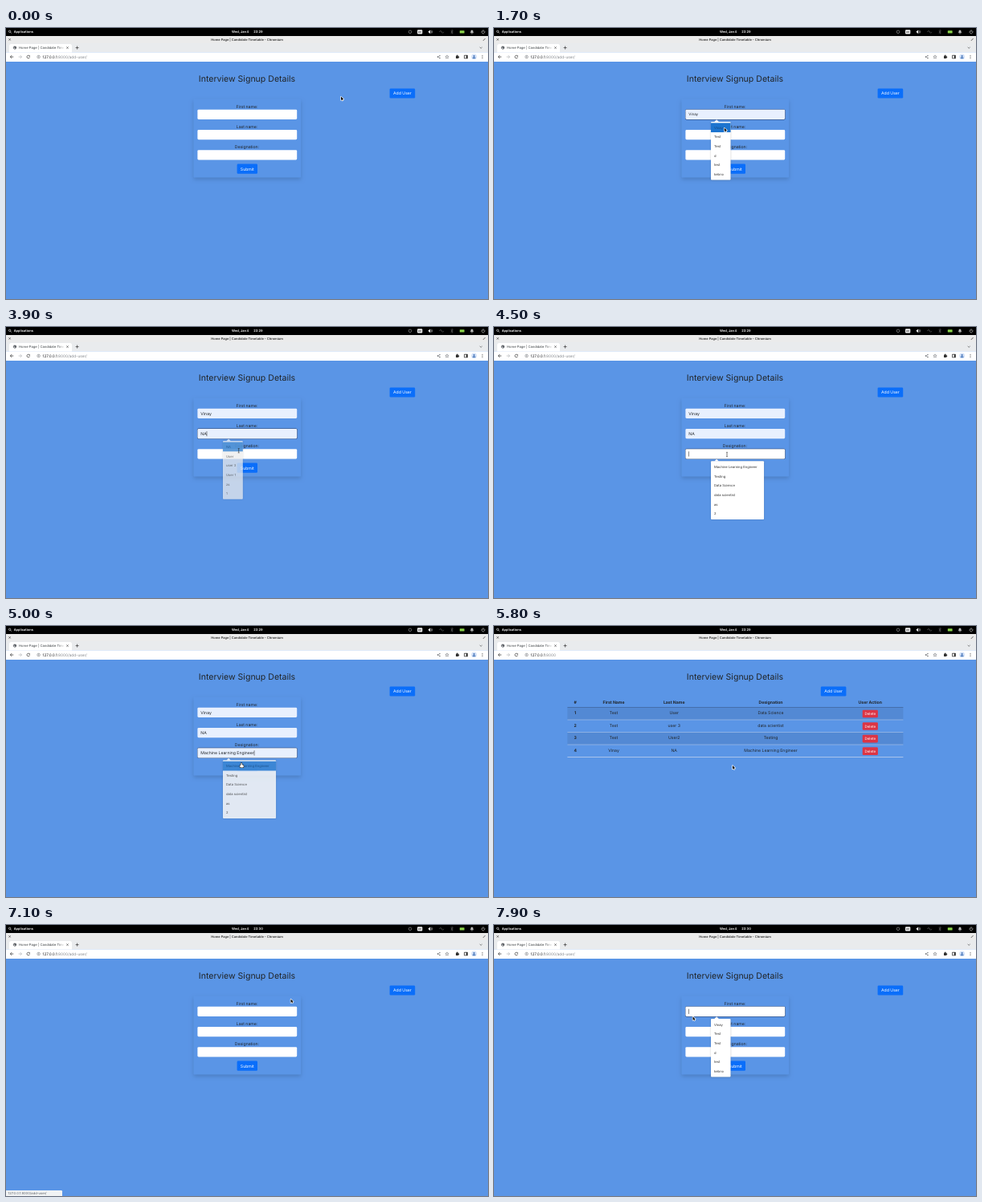
An HTML page with a canvas for the animation above (8000 ms loop, 600 by 338 pixels).

```html
<!DOCTYPE html>
<html lang="en">
<head>
<meta charset="utf-8">
<title>Interview Signup Details</title>
<style>
html, body { margin: 0; width: 100%; height: 100%; overflow: hidden; background: #5a95e6; }
canvas { display: block; width: 600px; height: 338px; }
</style>
</head>
<body>
<canvas id="stage" width="600" height="338"></canvas>
<script>
const ctx = document.getElementById('stage').getContext('2d');
const LOOP = 8000, LIST_AT = 5550, FORM_AT = 6920, CLOCK_AT = 6850;
const BLUE = '#5a95e6', PRIMARY = '#0a6efa', INK = '#212529', FILLED = '#e8f0fe';
const TITLE = 'Home Page | Candidate Timetable';
const PERSON = 'Vinay', ROLE = 'Machine Learning Engineer';

// Boxes: x, y, width, height
const SUBMIT = [287.6, 169.6, 25.4, 12.2];
const ADD_ON_FORM = [477.6, 75.4, 31.6, 12.2];
const ADD_ON_LIST = [406.8, 75.4, 31.6, 12.2];
const ROW = 11.65, POPUP_H = ROW * 6 + 2.8;
const inputBox = i => [238.4, 101.8 + i * 25.2, 123.8, 12.2];
const popupTop = p => inputBox(p.field)[1] + 15.1;

const labels = ['First name:', 'Last name:', 'Designation:'];
const firstNames = [PERSON, 'Test', 'Test', 'd', 'test', 'kebno'];
const popups = [
  { field: 0, open: 1220, pick: 1830, items: firstNames },
  { field: 1, open: 2420, pick: 3820, items: ['NA', 'User', 'user 3', 'User 1', 'zs', '1'] },
  { field: 2, open: 4350, pick: 4960, items: [ROLE, 'Testing', 'Data Science', 'data scientist', 'as', '2'] },
  { field: 0, open: 7530, pick: Infinity, items: firstNames }
];
const people = [
  ['Test', 'User', 'Data Science'],
  ['Test', 'user 3', 'data scientist'],
  ['Test', 'User2', 'Testing'],
  [PERSON, 'NA', ROLE]
];

// Pointer stops: arrival time, x, y
const stops = [
  [0, 417, 85.6], [380, 492, 95], [800, 304, 175], [1140, 286, 108], [1600, 286.7, 124.6],
  [2250, 288, 133], [2700, 287, 154.4], [3120, 287.5, 172], [3550, 289.7, 154.2],
  [4250, 290, 159], [4750, 293, 171], [5400, 297, 174], [6400, 428, 90.2],
  [6680, 424, 81], [7440, 247.5, 110], [7850, 247.5, 114.3]
];

// Longer ways take longer; the pointer rests until it has to leave.
function pointer(t) {
  let [left, x, y] = stops[0];
  for (const [end, nx, ny] of stops.slice(1)) {
    const from = Math.max(left, end - 200 - 2.2 * Math.hypot(nx - x, ny - y));
    if (t < end) {
      const k = Math.max(0, (t - from) / (end - from)), e = k * k * (3 - 2 * k);
      return { x: x + (nx - x) * e, y: y + (ny - y) * e };
    }
    [left, x, y] = [end, nx, ny];
  }
  return { x, y };
}

function rect(x, y, w, h, color, r = 0) {
  ctx.fillStyle = color;
  ctx.beginPath();
  ctx.roundRect(x, y, w, h, r);
  ctx.fill();
}

function text(s, x, y, { size = 5.15, weight = 400, color = INK, align = 'left' } = {}) {
  ctx.font = `${weight} ${size}px Inter, "Open Sans", sans-serif`;
  ctx.fillStyle = color;
  ctx.textAlign = align;
  ctx.fillText(s, x, y + size * 0.36);
  return ctx.measureText(s).width;
}

const center = (s, x, y, opt) => text(s, x, y, { ...opt, align: 'center' });

function stroke(points, color, width = 0.7, close = false) {
  ctx.strokeStyle = color;
  ctx.lineWidth = width;
  ctx.beginPath();
  points.forEach(([x, y]) => ctx.lineTo(x, y));
  if (close) ctx.closePath();
  ctx.stroke();
}

function polygon(points, color) {
  ctx.fillStyle = color;
  ctx.beginPath();
  points.forEach(([x, y]) => ctx.lineTo(x, y));
  ctx.fill();
}

function ring(x, y, r, color, width = 0.6, from = 0, to = Math.PI * 2) {
  ctx.strokeStyle = color;
  ctx.lineWidth = width;
  ctx.beginPath();
  ctx.arc(x, y, r, from, to);
  ctx.stroke();
}

const dot = (x, y, r, color) => rect(x - r, y - r, 2 * r, 2 * r, color, r);

function cross(x, y, r, color) {
  stroke([[x - r, y - r], [x + r, y + r]], color);
  stroke([[x - r, y + r], [x + r, y - r]], color);
}

function button(s, [x, y, w, h], color = PRIMARY, size = 5.15) {
  rect(x, y, w, h, color, 1.3);
  center(s, x + w / 2, y + h / 2, { size, color: '#fff' });
}

function panel(t) {
  const bold = { size: 4, weight: 600, color: '#fff' };
  rect(0, 0, 600, 10, '#000');
  ring(4.6, 4.3, 1.2, '#fff');
  stroke([[5.5, 5.2], [6.7, 6.5]], '#fff');
  text('Applications', 9.7, 4.8, bold);
  text('Wed, Jan', 281, 4.8, bold);
  text('4', 299.5, 4.8, bold);
  text(t < CLOCK_AT ? '23:29' : '23:30', 308.3, 4.8, bold);

  ring(503, 4.8, 1.8, '#aaa');
  rect(512, 2.2, 6.3, 5.3, '#eee', 1);
  center('en', 515.1, 4.8, { size: 3.4, weight: 600, color: '#333' });
  polygon([[525.4, 4.8], [528.2, 2.4], [528.2, 7.2]], '#fff');
  [1.5, 2.6].forEach(r => ring(528, 4.8, r, '#eee', 0.5, -0.9, 0.9));
  ring(541, 5, 1.4, '#777', 0.5, Math.PI, 0);
  ring(543.6, 4.8, 1.3, '#777', 0.5, 0, Math.PI);
  stroke([[553.6, 3.4], [556.4, 6], [555, 7.3], [555, 2.3], [556.4, 3.6], [553.6, 6.2]], '#777', 0.5);
  rect(564.8, 3.2, 5.8, 3.4, '#8bd34a', 0.6);
  rect(578.5, 2.6, 3, 3.4, '#bbb', [1.5, 1.5, 0, 0]);
  rect(577.8, 5.5, 4.4, 0.7, '#bbb');
  dot(580, 6.9, 0.6, '#bbb');
  ring(594, 5, 1.9, '#ddd', 0.6, -1, Math.PI + 1);
  stroke([[594, 2.3], [594, 4.8]], '#ddd');
}

function tabs() {
  const dark = '#333';
  rect(0, 10, 600, 9, '#ebebeb');
  center(TITLE + ' - Chromium', 300, 14.4, { size: 4, weight: 600, color: dark });
  cross(4.6, 14.4, 1.1, dark);
  stroke([[593.9, 15.9], [596.5, 13.1]], dark);

  rect(0, 19, 600, 11.3, '#e9ebed');
  rect(4, 20, 78, 10.5, '#fff', [2.5, 2.5, 0, 0]);
  dot(11, 24.6, 2.1, '#5f6368');
  stroke([[9.5, 24], [10.8, 25], [10.6, 26]], '#fff');
  ctx.save();
  ctx.beginPath();
  ctx.rect(15, 20, 57, 10);
  ctx.clip();
  text(TITLE, 16, 24.6, { size: 4.15, color: '#3c4043' });
  ctx.restore();
  const fade = ctx.createLinearGradient(66, 0, 72.5, 0);
  fade.addColorStop(0, 'rgba(255,255,255,0)');
  fade.addColorStop(1, '#fff');
  rect(66, 21, 6.5, 8, fade);
  cross(76.5, 24.6, 1.1, dark);
  stroke([[86.6, 24.6], [90.6, 24.6]], dark);
  stroke([[88.6, 22.6], [88.6, 26.6]], dark);
  stroke([[589.7, 23.9], [591.2, 25.3], [592.7, 23.9]], dark, 0.6);
}

function toolbar(list) {
  const gray = '#5f6368', dark = '#333';
  rect(0, 30.2, 600, 11.8, '#fff');
  const arrow = (x, d, color) => {
    stroke([[x - 2 * d, 36], [x + 2 * d, 36]], color);
    stroke([[x, 34], [x - 2 * d, 36], [x, 38]], color);
  };
  arrow(7.3, 1, dark);
  arrow(17.6, -1, '#b4b6b9');
  ring(27.8, 36, 1.8, dark, 0.7, 0.3, 5.4);
  polygon([[28.3, 35.6], [30, 35.6], [30, 33.9]], dark);
  ring(40.6, 36, 1.8, gray, 0.5);
  stroke([[40.6, 34.7], [40.6, 37.1]], gray, 0.5);
  const w = text('127.0.0.1', 45.5, 36, { size: 4.78, color: '#202124' });
  text(':8000' + (list ? '' : '/add-user/'), 45.5 + w, 36, { size: 4.78, color: '#85898e' });

  const share = [[540, 34.6], [537.4, 36], [540, 37.5]];
  stroke(share, gray, 0.5);
  share.forEach(([x, y]) => dot(x, y, 0.7, gray));
  const star = Array.from({ length: 10 }, (_, i) => {
    const r = i % 2 ? 1 : 2.3, a = i * Math.PI / 5 - Math.PI / 2;
    return [549 + r * Math.cos(a), 36.1 + r * Math.sin(a)];
  });
  stroke(star, gray, 0.5, true);
  rect(560, 34.5, 3.4, 3.6, dark, 0.4);
  dot(561.7, 34.3, 0.8, dark);
  dot(563.5, 36.3, 0.8, dark);
  rect(570.2, 33.8, 4.6, 4.5, dark, 0.4);
  rect(570.9, 34.6, 1.9, 2.9, '#fff');
  dot(582.6, 36, 3.4, '#d4e2f8');
  dot(582.6, 35.1, 1, '#3d6fb5');
  rect(580.8, 36.4, 3.6, 1.6, '#3d6fb5', [1, 1, 0, 0]);
  for (let i = -1; i < 2; i++) dot(593, 36 + i * 1.7, 0.5, dark);
}

function hoverRow(p, t) {
  if (t < p.open + 400) return -1;
  if (t >= p.pick) return 0;
  const row = Math.floor((pointer(t).y - popupTop(p) - 1.5) / ROW);
  return row < p.items.length ? row : -1;
}

function fieldState(i, t) {
  const p = popups.find(q => q.field === i && (q.open > FORM_AT) === (t > FORM_AT));
  if (!p) return { value: '' };
  const focus = p.open - 80, next = popups[popups.indexOf(p) + 1];
  const blur = i < 2 && next ? next.open - 80 : Infinity;
  const row = hoverRow(p, t), picked = t >= p.pick;
  const focused = t >= focus && t < blur;
  const preview = row >= 0 && !picked;
  return {
    value: p.items[row] || '',
    filled: row >= 0,
    preview,
    focused,
    caret: focused && !preview && (t - (picked ? p.pick : focus)) % 1000 < 500
  };
}

function form(t) {
  ctx.save();
  ctx.shadowColor = 'rgba(0,0,0,0.15)';
  ctx.shadowBlur = 5;
  ctx.shadowOffsetY = 2.5;
  rect(233.5, 88.5, 133.6, 98, BLUE, 1);
  ctx.restore();
  button('Add User', ADD_ON_FORM);
  labels.forEach((label, i) => {
    const s = fieldState(i, t), [x, y, w, h] = inputBox(i);
    center(label, 300, y - 4);
    if (s.focused) rect(x - 0.4, y - 0.4, w + 0.8, h + 0.8, '#2a3f66', 1.7);
    rect(x, y, w, h, s.filled ? FILLED : '#fff', 1.4);
    const end = 242.3 + text(s.value, 242.3, y + 6, { size: s.preview ? 4.5 : 5.15 });
    if (s.caret) rect(end, y + 3, 0.5, 6.2, '#111');
  });
  button('Submit', SUBMIT);
}

function popup(p, t) {
  const alpha = Math.min(1, (t - p.open) / 120, 1 - (t - p.pick) / 250);
  if (alpha <= 0) return;
  const top = popupTop(p), row = hoverRow(p, t), size = 4.15;
  ctx.save();
  ctx.globalAlpha = alpha;
  ctx.font = `${size}px Inter, "Open Sans", sans-serif`;
  const w = Math.max(23, 12.5 + Math.max(...p.items.map(s => ctx.measureText(s).width)));
  ctx.shadowColor = 'rgba(0,0,0,0.25)';
  ctx.shadowBlur = 2;
  rect(270, top, w, POPUP_H, '#fff', 1);
  ctx.shadowColor = 'transparent';
  polygon([[274.4, top + 0.2], [277.1, top - 2.6], [279.8, top + 0.2]], '#fff');
  if (row >= 0) rect(270, top + 1.5 + row * ROW, w, ROW, '#1c74cf');
  p.items.forEach((s, i) =>
    text(s, 274, top + 7.4 + i * ROW, { size, color: i === row ? '#174a80' : '#333' }));
  ctx.restore();
}

function table() {
  const cols = [101.2, 149, 224.2, 344.5, 468.2], rowH = 15.55;
  button('Add User', ADD_ON_LIST);
  ['#', 'First Name', 'Last Name', 'Designation', 'User Action'].forEach((s, i) =>
    center(s, cols[i], 95.4, { weight: 700 }));
  people.forEach((person, i) => {
    const y = 101.6 + i * rowH;
    if (i % 2 === 0) rect(91.4, y, 418, rowH, 'rgba(0,0,0,0.08)');
    rect(91.4, y + rowH - 0.5, 418, 0.6, '#c3d3ee');
    center(i + 1, cols[0], y + 6.6, { weight: 700 });
    person.forEach((s, n) => center(s, cols[n + 1], y + 6.6));
    button('Delete', [458.7, y + 3.1, 19.2, 9.6], '#dc3545', 4.5);
  });
  rect(91.4, 101.2, 418, 0.6, '#34507c');
}

function linkHint(t) {
  if (t < 6700 || t > 7330) return;
  rect(0, 331, 70, 7, '#f1f3f4', [0, 1.2, 0, 0]);
  text('127.0.0.1:8000/add-user/', 2.5, 334.6, { size: 4.15, color: '#5f6368' });
}

function cursorKind(pt, t, list) {
  const over = ([x, y, w, h]) => pt.x > x && pt.x < x + w && pt.y > y && pt.y < y + h;
  if (popups.some(p => t > p.open && t < p.pick && over([270, popupTop(p), 23, POPUP_H]))) return 'arrow';
  if (over(list ? ADD_ON_LIST : SUBMIT)) return 'hand';
  return !list && labels.some((_, i) => over(inputBox(i))) ? 'beam' : 'arrow';
}

function cursor(t, list) {
  const pt = pointer(t), kind = cursorKind(pt, t, list);
  ctx.save();
  ctx.translate(pt.x, pt.y);
  ctx.lineJoin = 'round';
  if (kind === 'beam') {
    stroke([[0, -2.6], [0, 2.6]], '#222', 0.6);
    [-2.7, 2.7].forEach(y => stroke([[-1, y], [1, y]], '#222', 0.5));
  } else if (kind === 'hand') {
    [['#111', 0.5], ['#fff', 0]].forEach(([color, pad]) => {
      rect(-0.6 - pad, -pad, 1.3 + 2 * pad, 4, color, 0.6);
      rect(-1.7 - pad, 2.3 - pad, 4.4 + 2 * pad, 3.3 + 2 * pad, color, 1.2);
    });
  } else {
    const shape = [[0, 0], [0, 4.5], [1.1, 3.6], [1.8, 5], [2.6, 4.6], [1.9, 3.3], [3.3, 3.2]];
    stroke(shape, '#fff', 1.3, true);
    polygon(shape, '#111');
  }
  ctx.restore();
}

function draw(t) {
  const list = t >= LIST_AT && t < FORM_AT;
  ctx.textRendering = 'geometricPrecision';
  rect(0, 0, 600, 338, BLUE);
  panel(t);
  tabs();
  toolbar(list);
  center('Interview Signup Details', 300, 63.7, { size: 10.55 });
  if (list) table();
  else {
    form(t);
    popups.forEach(p => popup(p, t));
  }
  linkHint(t);
  cursor(t, list);
}

const start = performance.now();
function tick() {
  draw((performance.now() - start) % LOOP);
  requestAnimationFrame(tick);
}
tick();
</script>
</body>
</html>
```
